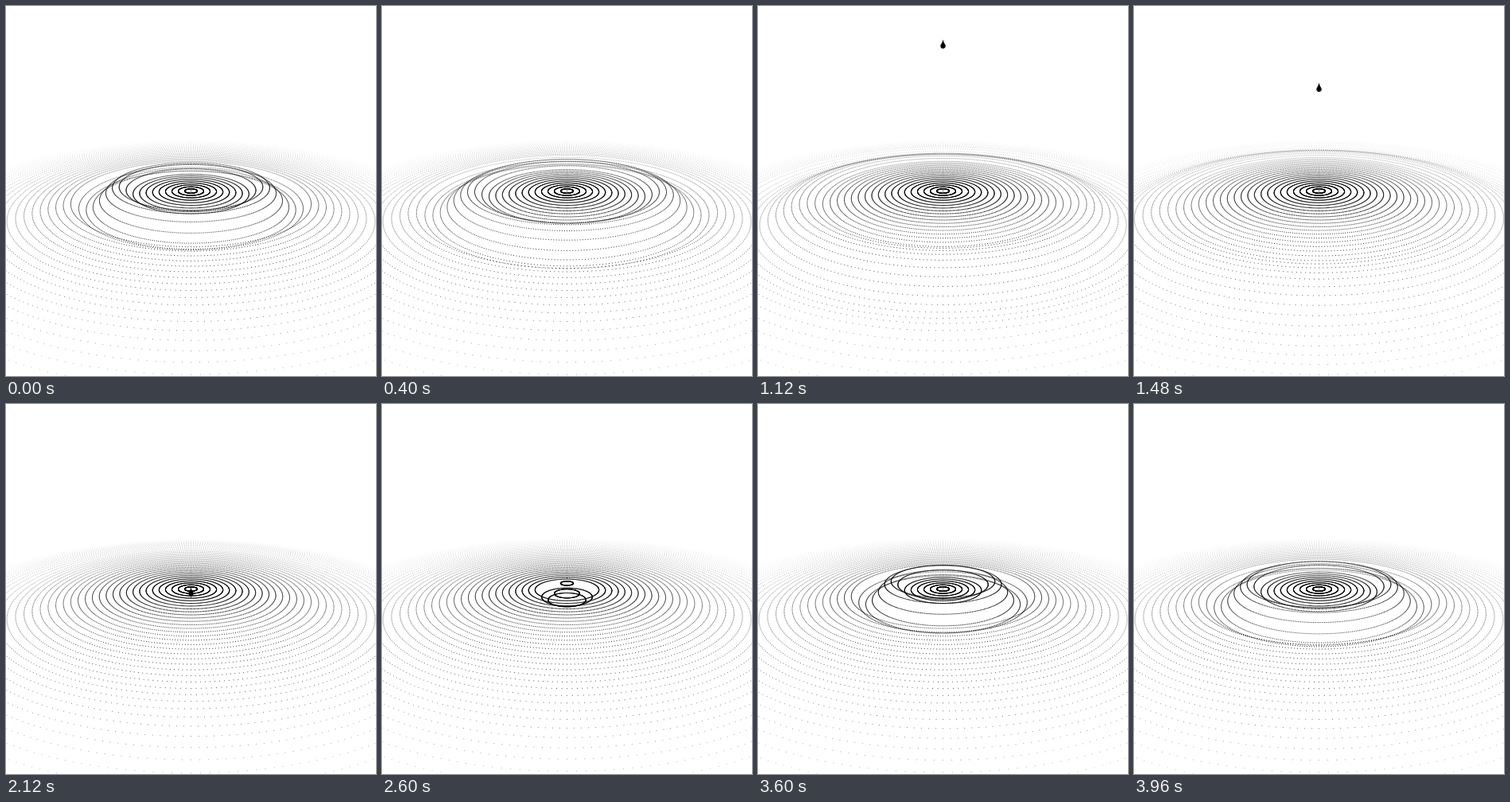
Animation, 465 px wide and 465 px high, one loop 4 s. Source, as an HTML page with a canvas:

```html
<!DOCTYPE html>
<html lang="en">
<head>
<meta charset="utf-8">
<title>Drop and ripples</title>
<style>
  html, body { margin: 0; width: 100%; height: 100%; overflow: hidden; background: #fff; }
  canvas { display: block; width: 465px; height: 465px; }
</style>
</head>
<body>
<canvas id="stage" width="465" height="465"></canvas>
<script>
const ctx = document.getElementById('stage').getContext('2d');
const SIZE = 465, CENTER = SIZE / 2;
const STEP_MS = 40, STEPS = 100;

// Camera: distance to the pool centre and its elevation angle.
const DISTANCE = 447, SIN = 0.338, COS = Math.sqrt(1 - SIN * SIN);

const RINGS = 39, RING_GAP = 8, DOTS = 360, FADE_RADIUS = 320;
const IMPACT = 51.5, DROP_END = 54;

const angles = Array.from({ length: DOTS }, (_, i) => {
  const a = i * 2 * Math.PI / DOTS;
  return [Math.cos(a), Math.sin(a)];
});

// One sine period, trough first, that widens and flattens as it travels.
function rippleAt(step) {
  const age = step - IMPACT;
  if (age < 0) return () => 0;
  const tail = 2.5 * age - 47;
  const length = 50 + 0.0085 * age * age;
  const height = 14.5 * Math.exp(-((age / 80) ** 3));
  return radius => {
    const phase = (radius - tail) / length;
    return phase > 0 && phase < 1 ? height * Math.sin(2 * Math.PI * phase) : 0;
  };
}

function drawRing(radius, height) {
  const count = radius ? DOTS : 1;
  const strength = 1 - radius / FADE_RADIUS;
  for (let i = 0; i < count; i++) {
    const x = radius * angles[i][0], near = radius * angles[i][1];
    const scale = DISTANCE / (DISTANCE - near * COS - height * SIN);
    const px = CENTER + x * scale;
    const py = CENTER + (near * SIN - height * COS) * scale;
    if (px < 0 || px > SIZE || py > SIZE) continue;
    ctx.globalAlpha = Math.min(1, strength * scale);
    ctx.fillRect(px - 0.5, py - 0.5, 1, 1);
  }
}

function drawDrop(step) {
  const y = -22.5 + 0.0928 * step * step;
  ctx.globalAlpha = 1;
  ctx.beginPath();
  ctx.moveTo(CENTER, y - 8);
  ctx.quadraticCurveTo(CENTER + 0.8, y - 4, CENTER + 2.9, y - 1.4);
  ctx.arc(CENTER, y, 3.2, -0.45, Math.PI + 0.45);
  ctx.quadraticCurveTo(CENTER - 0.8, y - 4, CENTER, y - 8);
  ctx.fill();
}

function draw(step) {
  ctx.clearRect(0, 0, SIZE, SIZE);
  ctx.fillStyle = '#000';
  const fresh = rippleAt(step), fading = rippleAt(step + STEPS);
  for (let n = 0; n <= RINGS; n++) {
    const radius = n * RING_GAP;
    drawRing(radius, fresh(radius) + fading(radius));
  }
  if (step < DROP_END) drawDrop(step);
}

const begin = performance.now();
let shown = 0;
function tick() {
  const elapsed = Math.max(0, performance.now() - begin);
  const step = Math.floor(elapsed / STEP_MS) % STEPS;
  if (step !== shown) draw(shown = step);
  requestAnimationFrame(tick);
}
draw(0);
requestAnimationFrame(tick);
</script>
</body>
</html>
```
